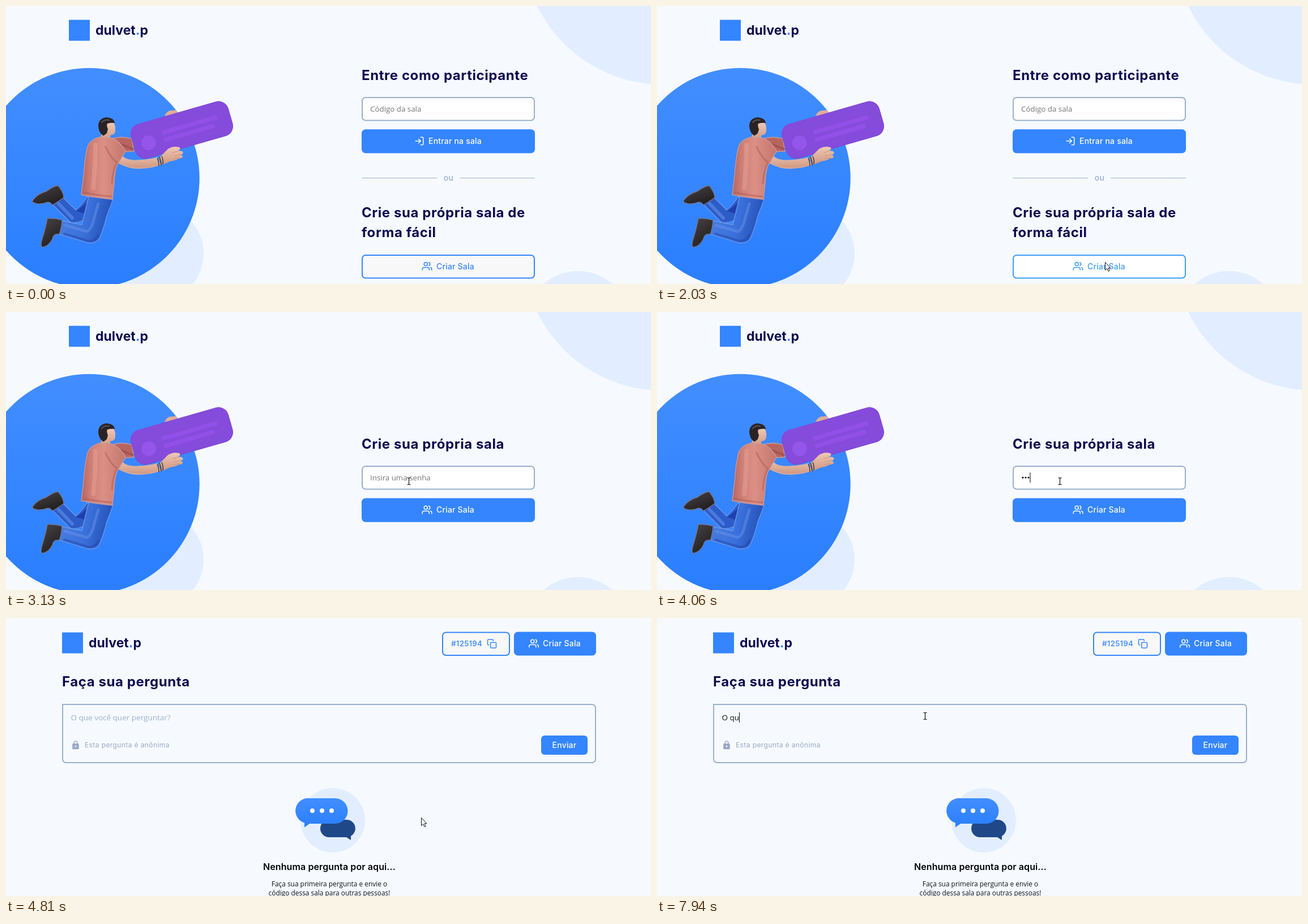
Animation, 1139 px wide and 492 px high, one loop 8000 ms. Source, as an HTML page:

```html
<!DOCTYPE html>
<html lang="pt-BR">
<head>
<meta charset="utf-8">
<title>Sala de perguntas</title>
<style>
  html, body { margin: 0; width: 100%; height: 100%; overflow: hidden; background: #f6faff; }
  svg { display: block; }
  text { font-family: Inter, sans-serif; white-space: pre; }
  .title { font-size: 24px; font-weight: 700; letter-spacing: .57px; fill: #0d094e; }
  .logo { font-size: 23px; font-weight: 700; fill: #0d094e; }
  .label { font-size: 14px; font-weight: 500; letter-spacing: .2px; fill: currentColor; }
  .open { font-family: "Open Sans", sans-serif; font-size: 13.33px; }
  .hint { fill: #757575; }
  .mid { text-anchor: middle; }
  .icon { fill: none; stroke: currentColor; stroke-width: 2; stroke-linecap: round; stroke-linejoin: round; }
  .field { fill: #fff; stroke: #9bafcd; stroke-width: 2; }
  .solid { color: #fff; }
  .solid > rect { fill: #3485ff; }
  .solid.hover > rect { fill: #3fa0ff; }
  .outline { color: #3485ff; }
  .outline > rect { fill: #f8f8f8; stroke: currentColor; stroke-width: 2; }
  .outline.hover { color: #3d9df5; }
  .outline.hover > rect { fill: #fff; }
  .soft { fill: #e2eeff; }
  .beam { fill: none; stroke: #111; stroke-width: 1.2; }
  .rim { stroke-width: 1.3; stroke-linejoin: round; }
  .cloth { stroke: #c99a9c; }
  .denim { stroke: #6f98e6; }
  .leather { stroke: #777486; }
  .shade { fill: none; stroke-linecap: round; }
</style>
</head>
<body>
<svg width="1139" height="492" viewBox="0 0 1139 492">
  <defs>
    <linearGradient id="sky" x2="0" y2="1"><stop stop-color="#428eff"/><stop offset="1" stop-color="#2a7eff"/></linearGradient>
    <linearGradient id="shirt"><stop stop-color="#b5655f"/><stop offset=".22" stop-color="#cf7f75"/><stop offset=".5" stop-color="#dc9085"/><stop offset="1" stop-color="#c4766d"/></linearGradient>
    <linearGradient id="jeans" x2="1" y2=".2"><stop stop-color="#4a7fe2"/><stop offset=".6" stop-color="#3a70da"/><stop offset="1" stop-color="#2451b8"/></linearGradient>
    <linearGradient id="skin" x2="0" y2="1"><stop stop-color="#efc9b4"/><stop offset="1" stop-color="#cf9781"/></linearGradient>
    <linearGradient id="shoe" x2=".6" y2="1"><stop stop-color="#4a4547"/><stop offset="1" stop-color="#211e20"/></linearGradient>
    <g id="users" class="icon"><path d="M17 21v-2a4 4 0 0 0-4-4H5a4 4 0 0 0-4 4v2M23 21v-2a4 4 0 0 0-3-3.87M16 3.13a4 4 0 0 1 0 7.75"/><circle cx="9" cy="7" r="4"/></g>
    <g id="brand">
      <rect width="37" height="37" fill="#3485ff"/>
      <text class="logo" x="47" y="26">dulvet<tspan fill="#3485ff">.</tspan>p</text>
    </g>
  </defs>

  <g id="home">
    <circle class="soft" cx="1160" cy="-108" r="247"/>
    <circle class="soft" cx="1010" cy="561" r="92"/>
    <circle class="soft" cx="263" cy="438" r="86"/>
    <circle cx="147" cy="304.500" r="194.700" fill="url(#sky)"/>
    <use href="#brand" x="111" y="24.500"/>

    <g id="person">
      <!-- far leg, then near leg -->
      <path class="rim denim" fill="#2c5cc8" d="M143 338L172 342Q160 362 146 372Q132 386 114 383L82 351L99 337Q112 350 123 361Q134 352 143 338z"/>
      <path fill="#1f3fae" d="M145 345L160 345Q155 366 146 372Q137 366 124 363Q136 355 145 345z"/>
      <path class="shade" stroke="#5f8eea" stroke-width="6" opacity=".6" d="M93 350L117 375"/>
      <path class="rim leather" fill="url(#shoe)" d="M47 344Q56 332 71 328Q85 318 92 318Q101 328 102 339Q91 347 82 352Q76 344 68 349Q55 352 47 347z"/>
      <path class="rim denim" fill="url(#jeans)" d="M146 337L189 342Q184 357 178 371Q172 397 164 413Q157 421 144 419L94 404L99 380L134 387Q140 362 146 337z"/>
      <path class="shade" stroke="#6a96ea" stroke-width="5" opacity=".45" d="M104 388L143 399Q151 396 156 374L163 350"/>
      <path class="shade" stroke="#2147ab" stroke-width="4" opacity=".5" d="M103 403L146 416Q158 416 163 405"/>
      <path class="rim leather" fill="url(#shoe)" d="M73 376Q86 375 99 379Q98 393 94 404Q84 402 82 412Q76 425 64 427Q60 424 64 412Q70 393 73 376z"/>

      <!-- far arm and hand -->
      <path class="rim cloth" fill="#b9655f" d="M183 236Q204 229 222 235L226 257L204 258z"/>
      <path class="shade" stroke="#96494a" stroke-width="4" opacity=".6" d="M201 244L224 253"/>
      <path fill="#dfac97" d="M280 194Q285 184 293 185L300 184L304 190L299 195z"/>

      <!-- card -->
      <g transform="translate(310.500 219.500) rotate(-16)">
        <rect x="-89.500" y="-31.700" width="179" height="63.400" rx="18" fill="#7c46cf"/>
        <rect x="-89.500" y="-31.700" width="179" height="62.300" rx="18" fill="#854bdb"/>
        <circle cx="-62.500" cy="5.500" r="13" fill="#9455ea"/>
        <path d="M-35 -5H66M-35 8.500H58" stroke="#9150e8" stroke-width="8"/>
      </g>

      <!-- head -->
      <path fill="url(#skin)" d="M174 206L190 206Q194 214 193 219Q194 228 184 229L184 238L166 236L170 222z"/>
      <path fill="#292326" d="M163 213Q163 199 177 197Q191 198 192 207Q186 206 179 208Q177 211 180 218L178 225Q173 230 171 229Q164 224 163 213z"/>
      <path class="shade" stroke="#5d5356" stroke-width="2" d="M169 206Q174 200 182 202"/>

      <!-- near arm -->
      <path class="rim" stroke="#d9b0a4" fill="url(#skin)" d="M199 259Q208 272 223 273Q247 274 267 268L273 281Q246 290 220 286Q204 282 193 274z"/>
      <path fill="url(#skin)" d="M270 269L286 253Q296 247 306 250Q310 252 304 256L311 257Q315 261 309 263L312 266Q312 270 305 270Q299 274 290 275L276 281z"/>
      <path fill="none" stroke="#c9907d" d="M294 260L305 256M296 265L309 263M296 270L307 268"/>
      <path fill="none" stroke="#343239" stroke-width="1.400" d="M267 269Q270 275 270 283M271 267Q274 274 274 282M275 266Q278 273 277 280"/>

      <!-- shirt -->
      <path class="rim cloth" fill="url(#shirt)" d="M165 232Q148 237 144 249Q139 269 137 300L133 334Q158 339 188 342L191 315Q192 288 198 279L211 257Q200 237 184 233z"/>
      <path class="shade" stroke="#a9574f" stroke-width="3" opacity=".45" d="M176 249Q184 268 196 277Q189 288 187 314M138 330Q160 335 186 337"/>
      <path class="shade" stroke="#e9a89c" stroke-width="8" opacity=".4" d="M158 246Q158 280 154 322"/>
    </g>

    <g id="entry">
      <text class="title" x="628" y="131">Entre como participante</text>
      <rect class="field" x="629" y="162" width="304" height="40.500" rx="6"/>
      <text class="open hint" x="643" y="187">Código da sala</text>
      <g class="solid">
        <rect x="628" y="218.300" width="306" height="42.200" rx="7"/>
        <path class="icon" transform="translate(721 230) scale(.75)" d="M15 3h4a2 2 0 0 1 2 2v14a2 2 0 0 1-2 2h-4M10 17l5-5-5-5M15 12H3"/>
        <text class="label" x="746" y="243.500">Entrar na sala</text>
      </g>
      <path d="M628 304.500H761M801 304.500H934" stroke="#9bb0d2"/>
      <text class="label mid" x="781.500" y="309" color="#9aabcb">ou</text>
      <text class="title" x="628" y="374">Crie sua própria sala de</text>
      <text class="title" x="628" y="409">forma fácil</text>
      <g id="open" class="outline">
        <rect x="629" y="441" width="304" height="40.500" rx="6"/>
        <use href="#users" transform="translate(734.500 451.500) scale(.75)"/>
        <text class="label" x="760" y="465.500">Criar Sala</text>
      </g>
    </g>

    <g id="create">
      <text class="title" x="628" y="242">Crie sua própria sala</text>
      <rect class="field" x="629" y="273" width="304" height="40.500" rx="6"/>
      <text id="passHint" class="open hint" x="643" y="298">Insira uma senha</text>
      <g id="dots"><circle cx="646" cy="293" r="1.600"/><circle cx="651" cy="293" r="1.600"/><circle cx="656" cy="293" r="1.600"/></g>
      <rect id="passCaret" y="284" width="1" height="18"/>
      <g id="make" class="solid">
        <rect x="628" y="329.500" width="306" height="42.200" rx="7"/>
        <use href="#users" transform="translate(734.500 341) scale(.75)"/>
        <text class="label" x="760" y="355">Criar Sala</text>
      </g>
    </g>
  </g>

  <g id="room">
    <use href="#brand" x="99" y="25.500"/>
    <g class="outline">
      <rect x="771" y="25.500" width="118" height="40.500" rx="6"/>
      <text class="label" x="786" y="50" style="font-size:13.500px">#125194</text>
      <g class="icon" transform="translate(849 36.500) scale(.75)"><rect x="9" y="9" width="13" height="13" rx="2"/><path d="M5 15H4a2 2 0 0 1-2-2V4a2 2 0 0 1 2-2h9a2 2 0 0 1 2 2v1"/></g>
    </g>
    <g class="solid">
      <rect x="897" y="24.500" width="145" height="42" rx="7"/>
      <use href="#users" transform="translate(923 36) scale(.75)"/>
      <text class="label" x="948" y="50">Criar Sala</text>
    </g>
    <text class="title" x="99" y="121">Faça sua pergunta</text>
    <path d="M100 153H1035a6 6 0 0 1 6 6V250a6 6 0 0 1-6 6H106a6 6 0 0 1-6-6z" fill="none" stroke="#9bafcd" stroke-width="2"/>
    <text id="ask" class="open" x="114.500" y="181" style="font-size:13.500px"></text>
    <rect id="askCaret" y="167" width="1" height="18"/>
    <path fill="#9ba6c6" fill-rule="evenodd" transform="translate(114.300 216.500) scale(.72)" d="M18 8h-1V6a5 5 0 0 0-10 0v2H6a2 2 0 0 0-2 2v10a2 2 0 0 0 2 2h12a2 2 0 0 0 2-2V10a2 2 0 0 0-2-2zM12 17a2 2 0 1 1 0-4a2 2 0 0 1 0 4zM15.100 8H8.900V6a3.100 3.100 0 0 1 6.200 0z"/>
    <text x="139" y="229" font-size="12" letter-spacing=".4" fill="#9ba8c2">Esta pergunta é anônima</text>
    <g class="solid">
      <rect x="945" y="208" width="82" height="34" rx="6"/>
      <text class="label mid" x="986" y="229.500">Enviar</text>
    </g>
    <circle class="soft" cx="577" cy="358" r="57"/>
    <path fill="#1f4888" d="M570.500 357H601.500a15.500 15.500 0 0 1 7.500 29V393L601 388H570.500a15.500 15.500 0 0 1 0-31z"/>
    <path fill="url(#sky)" d="M536 319H581a22.300 22.300 0 0 1 0 45H536L527 370.500V362.500a22.300 22.300 0 0 1 9-43.500z"/>
    <g fill="#fff"><circle cx="541" cy="341" r="4"/><circle cx="558" cy="341" r="4"/><circle cx="575" cy="341" r="4"/></g>
    <text class="mid" x="571" y="446" font-size="16" font-weight="600" letter-spacing=".1">Nenhuma pergunta por aqui...</text>
    <g class="mid" fill="#111">
      <text class="open" x="571" y="475" style="font-size:11.900px">Faça sua primeira pergunta e envie o</text>
      <text class="open" x="571" y="491" style="font-size:11.900px">código dessa sala para outras pessoas!</text>
    </g>
  </g>

  <g id="pointer">
    <path id="arrow" d="M.5 .5V14.500L3.700 11.500L5.900 16.500L8.100 15.500L6 10.700H9.800z" fill="#fff" stroke="#111"/>
    <path id="beam" class="beam" d="M-3 -6H-1L0 -5L1 -6H3M0 -5V5M-3 6H-1L0 5L1 6H3"/>
  </g>
</svg>
<script>
const LOOP = 8000, TICK = 70;
const CREATE = 2230, ROOM = 4810;
const el = id => document.getElementById(id);

// Pointer way points: time, x, y
const path = [
  [240, 790, 480], [380, 815, 441], [520, 850, 365], [660, 895, 319],
  [800, 948, 338], [1010, 898, 394], [1080, 879, 399], [1150, 860, 403],
  [1340, 860, 403], [1410, 848, 412], [1550, 805, 450], [1690, 780, 443],
  [1820, 780, 443], [1890, 781, 447], [1960, 786, 457], [2030, 791, 453],
  [2510, 791, 453], [2580, 786, 446], [2650, 765, 415], [2720, 745, 378],
  [2790, 725, 300], [2860, 716, 277], [2990, 716, 277], [3060, 713, 290],
  [3130, 711.5, 299.5], [4050, 711.5, 299.5], [4120, 712, 304], [4260, 716, 328],
  [4400, 727, 347], [4470, 732, 355], [4540, 733, 353], [5000, 733, 353],
  [5070, 725, 345], [5350, 560, 225], [5490, 480, 169], [5560, 473.5, 173.5]
];
const inputBox = [628, 272, 934, 314];
const askBox = [100, 153, 944, 256];
const openBox = [628, 440, 934, 482];
const makeBox = [628, 329, 934, 371];

const dotTimes = [3790, 3930, 4060];
const askSteps = [[7480, "O"], [7740, "O "], [7840, "O q"], [7940, "O qu"]];
const askHint = "O que você quer perguntar?";

const inside = ([x, y], [l, t, r, b]) => x >= l && x < r && y >= t && y < b;
const between = (t, a, b) => t >= a && t < b;
const show = (id, on) => el(id).setAttribute("display", on ? "inline" : "none");

function pointerAt(t) {
  const i = path.findLastIndex(p => p[0] <= t);
  if (i < 0) return null;
  const a = path[i], b = path[i + 1];
  if (!b) return a.slice(1);
  const k = Math.floor((t - a[0]) / TICK) * TICK / (b[0] - a[0]);
  return [a[1] + (b[1] - a[1]) * k, a[2] + (b[2] - a[2]) * k];
}

function drawPointer(t) {
  const pos = pointerAt(t);
  show("pointer", pos);
  const at = pos || [-99, -99];
  const creating = between(t, CREATE, ROOM);
  const onText = creating ? inside(at, inputBox) : t >= ROOM && inside(at, askBox);
  show("arrow", !onText);
  show("beam", onText);
  el("pointer").setAttribute("transform", `translate(${at})`);
  el("open").classList.toggle("hover", t < CREATE && inside(at, openBox));
  el("make").classList.toggle("hover", creating && inside(at, makeBox));
}

function drawPassword(t) {
  const n = dotTimes.filter(d => d <= t).length;
  [...el("dots").children].forEach((dot, i) => dot.setAttribute("opacity", i < n ? 1 : 0));
  show("passHint", n === 0);
  show("passCaret", between(t, 3260, 4550));
  el("passCaret").setAttribute("x", 643.5 + n * 5);
}

function drawQuestion(t) {
  const step = askSteps.findLast(s => s[0] <= t);
  const ask = el("ask");
  ask.textContent = step ? step[1] : askHint;
  ask.setAttribute("fill", step ? "#111" : "#9bb0cd");
  show("askCaret", between(t, 5680, 6160) || between(t, 6620, 7150) || step);
  el("askCaret").setAttribute("x", Math.round(114 + (step ? ask.getComputedTextLength() : 0)));
}

function render(t) {
  show("home", t < ROOM);
  show("entry", t < CREATE);
  show("create", t >= CREATE);
  show("room", t >= ROOM);
  drawPointer(t);
  drawPassword(t);
  drawQuestion(t);
}

const start = performance.now();
function frame() {
  render((performance.now() - start) % LOOP);
  requestAnimationFrame(frame);
}
frame();
</script>
</body>
</html>
```
